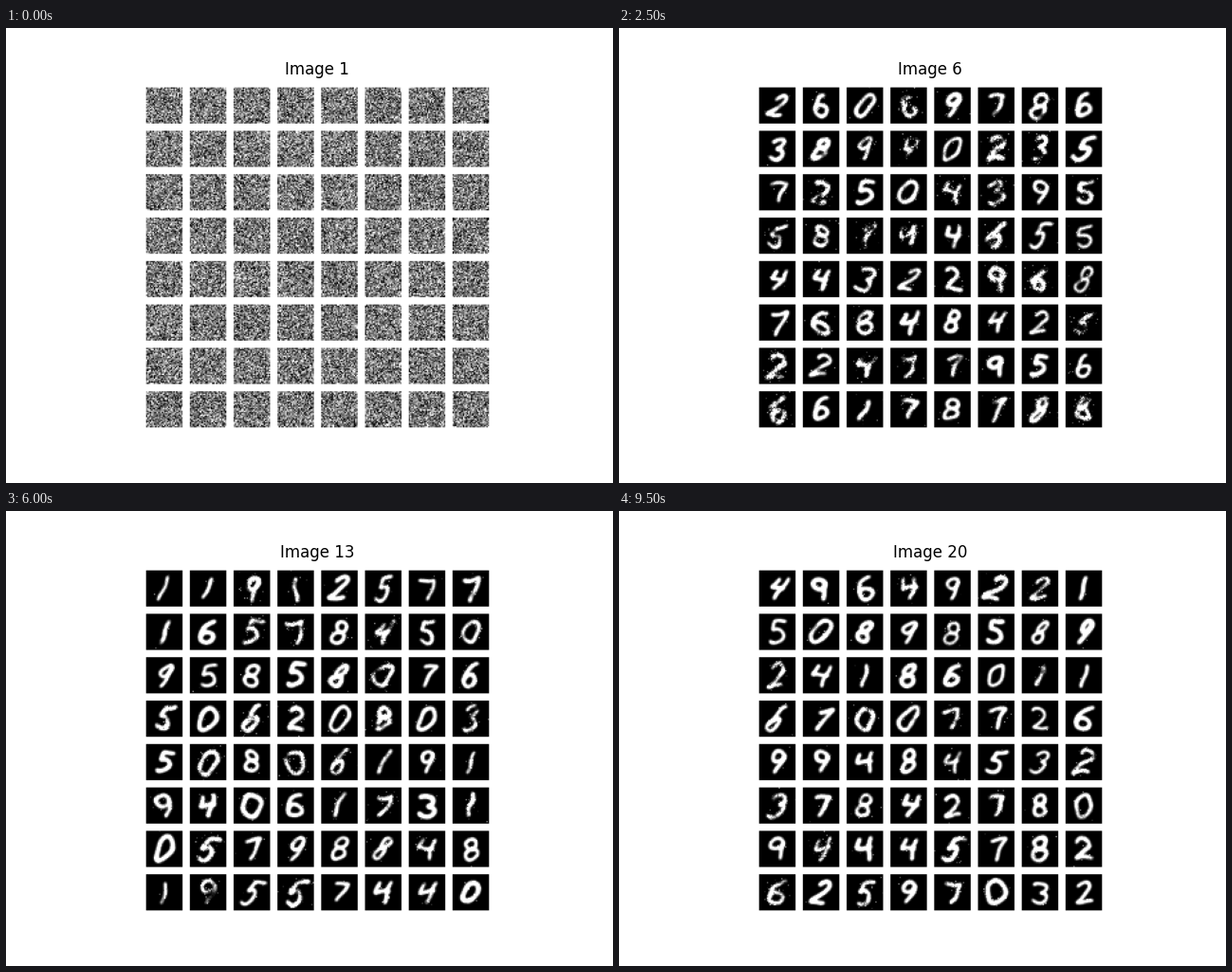
Write a matplotlib script that moves like this. It is 640 px wide and 480 px high and loops after 10 s.

```python
import numpy as np
import matplotlib.pyplot as plt
from matplotlib.animation import FuncAnimation

WIDTH, HEIGHT, DPI = 640, 480, 100
FRAMES, INTERVAL = 20, 500
SIDE, GRID = 28, 8
ZOOM = 5                      # mosaic pixels per tile pixel
TILE = SIDE * ZOOM
GAP = TILE // 5
LEFT, RIGHT, TOP, BOTTOM = 147.9, 508.9, 63, 421.2


def arc(cx, cy, rx, ry, start, stop):
    a = np.radians(np.linspace(start, stop, 40))
    return np.column_stack([cx + rx * np.cos(a), cy + ry * np.sin(a)])


def line(*points):
    return np.array(points, float)


def join(*parts):
    return np.vstack(parts)


# Strokes of each digit in a box from -1 to 1, y upward.
STROKES = [
    [arc(0, 0, .68, 1, 0, 360)],
    [line((0, 1), (0, -1))],
    [join(arc(0, .5, .55, .5, 160, -40), line((-.6, -.9), (.75, -.85)))],
    [join(arc(-.05, .5, .55, .48, 150, -75), arc(-.05, -.47, .62, .52, 80, -150))],
    [line((-.45, .85), (-.62, .02), (.65, .08)), line((.5, .9), (.3, -1))],
    [join(line((.65, .95), (-.3, .88), (-.42, .15)), arc(-.05, -.4, .6, .58, 110, -150))],
    [join(arc(.35, -.4, .9, 1.4, 90, 180), arc(0, -.45, .55, .5, 180, 540))],
    [line((-.65, .7), (.6, .85), (.05, -1))],
    [arc(0, .5, .45, .47, 0, 360), arc(0, -.48, .53, .5, 90, 450)],
    [join(arc(-.05, .45, .52, .48, 20, 380), line((.38, -.2), (.15, -1)))],
]


def resample(path, spacing=.4):
    """Points at even steps along a path."""
    steps = np.hypot(*np.diff(path, axis=0).T)
    length = np.concatenate([[0], np.cumsum(steps)])
    s = np.arange(0, length[-1], spacing)
    return np.column_stack([np.interp(s, length, path[:, k]) for k in (0, 1)])


def splat(points, sigma, spacing=.4):
    """Soft brush along the points, about 1 on the centre line."""
    pixels = np.arange(SIDE)
    gx = np.exp(-((points[:, :1] - pixels) / sigma) ** 2 / 2)
    gy = np.exp(-((points[:, 1:] - pixels) / sigma) ** 2 / 2)
    return gy.T @ gx * spacing / (sigma * np.sqrt(2 * np.pi))


def patches(rng):
    """Slow random field around 0 that fades parts of a digit."""
    y, x = np.mgrid[:SIDE, :SIDE]
    kx, ky = rng.normal(0, .35, (2, 4))
    phase = rng.uniform(0, 2 * np.pi, 4)
    return sum(np.sin(a * x + b * y + p) for a, b, p in zip(kx, ky, phase)) / 2


def handwritten(digit, rough, rng):
    slant = np.clip(rng.normal(.25, .18), -.05, .6)
    tall = rng.uniform(7.6, 9.2)
    wide = rng.uniform(8, 10.5) * (1 - .3 * slant)
    weight = np.clip(rng.normal(1, .2), .65, 1.5)
    rough *= rng.choice([.5, 1, 2], p=[.4, .35, .25])

    centre = 13.5 + rng.normal(0, .3, 2)
    phase = rng.uniform(0, 2 * np.pi, 2)
    placed = []
    for path in STROKES[digit]:
        x, y = path.T
        dots = resample(np.column_stack([x * wide + y * tall * slant, -y * tall]))
        sway = np.sin(dots[:, ::-1] * .35 + phase) * (.6 + 1.5 * rough)
        placed.append(dots + centre + sway)
    points = np.vstack(placed)

    ink = 1.6 * weight * splat(points, .75 + .25 * weight)
    ink *= np.clip(1 + 1.6 * rough * patches(rng), .1, 1.4)
    ink *= np.clip(rng.normal(1, .7 * rough, (SIDE, SIDE)), .2, 1.5)
    halo = np.clip(splat(points, 2.5), 0, 1)
    specks = rng.random((SIDE, SIDE)) < rough * (.01 + .2 * halo)
    ink += specks * rng.uniform(.1, .7, (SIDE, SIDE))
    return np.clip(ink - .06, 0, 1)


def make_tile(frame, rng):
    if frame == 0:
        return np.clip(rng.normal(.47, .26, (SIDE, SIDE)), 0, 1)
    rough = .15 + .35 * np.exp(-(frame - 1) / 4)
    return handwritten(rng.integers(10), rough, rng)


def make_mosaic(frame):
    rng = np.random.default_rng(100 + frame)
    side = GRID * TILE + (GRID + 1) * GAP
    mosaic = np.ones((side, side))
    for row in range(GRID):
        for col in range(GRID):
            y, x = (GAP + k * (TILE + GAP) for k in (row, col))
            mosaic[y:y + TILE, x:x + TILE] = np.kron(
                make_tile(frame, rng), np.ones((ZOOM, ZOOM)))
    return mosaic


fig = plt.figure(figsize=(WIDTH / DPI, HEIGHT / DPI), dpi=DPI, facecolor="white")
ax = fig.add_axes([0, 0, 1, 1])
ax.axis("off")
title = fig.text(328 / WIDTH, 1 - 49.3 / HEIGHT, "", fontsize=12, ha="center",
                 va="baseline", family="DejaVu Sans", color="black")

inner = GRID * TILE + (GRID - 1) * GAP
pad_x, pad_y = (GAP * span / inner for span in (RIGHT - LEFT, BOTTOM - TOP))
image = ax.imshow(make_mosaic(0), cmap="gray", vmin=0, vmax=1, aspect="auto",
                  interpolation="hanning",
                  extent=(LEFT - pad_x, RIGHT + pad_x, BOTTOM + pad_y, TOP - pad_y))
ax.set_xlim(0, WIDTH)
ax.set_ylim(HEIGHT, 0)


def update(frame):
    title.set_text(f"Image {frame + 1}")
    image.set_data(make_mosaic(frame))
    return title, image


anim = FuncAnimation(fig, update, frames=FRAMES, interval=INTERVAL,
                     repeat=True, repeat_delay=0, blit=False)
plt.show()
```
